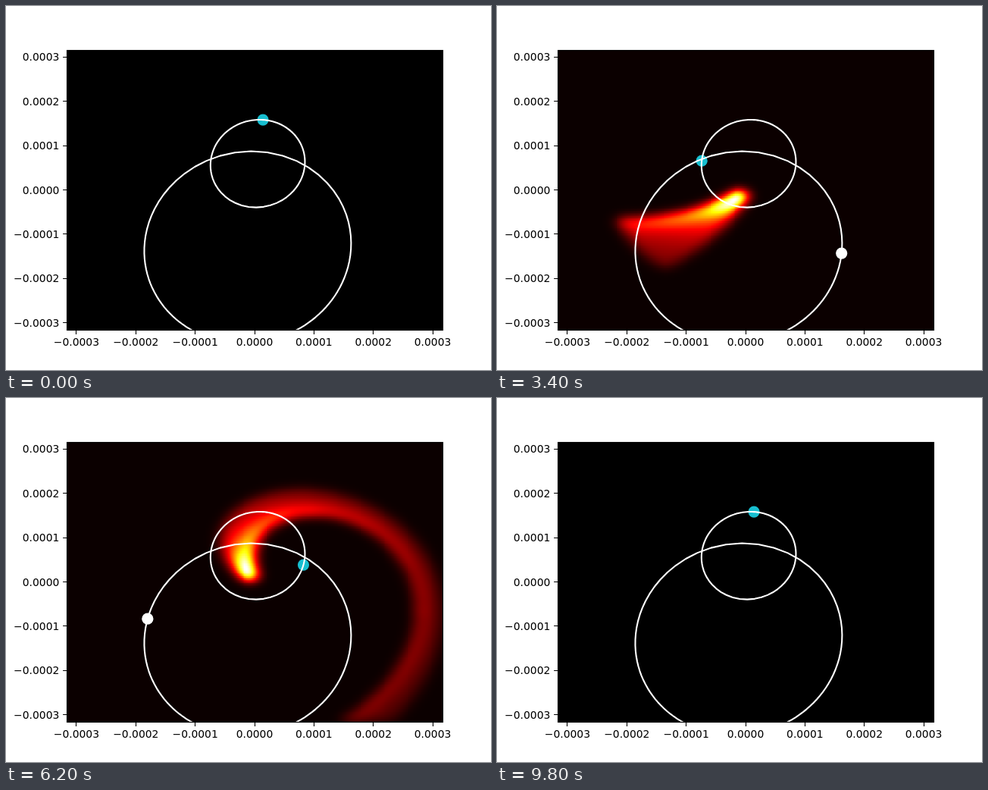
Write an HTML page with a canvas that moves like this. It is 640 by 480 pixels and loops after 10000 ms.

```html
<!DOCTYPE html>
<html lang="en">
<head>
<meta charset="utf-8">
<title>Binary orbit with dust outflow</title>
<style>
  html, body { margin: 0; width: 100%; height: 100%; overflow: hidden; background: #fff; }
  #stage { position: absolute; left: 0; top: 0; width: 640px; height: 480px; }
  #plot { position: absolute; left: 80px; top: 57.6px; width: 496px; height: 369.6px;
          image-rendering: pixelated; background: #000; }
  svg { position: absolute; left: 0; top: 0; }
  text { font: 13.89px "DejaVu Sans", sans-serif; fill: #000; }
  .orbit { fill: none; stroke: #fff; stroke-width: 2.08; stroke-linejoin: round; }
  .axis { fill: none; stroke: #000; stroke-width: 1.11; }
</style>
</head>
<body>
<div id="stage">
  <canvas id="plot" width="256" height="256"></canvas>
  <svg width="640" height="480" viewBox="0 0 640 480">
    <defs><clipPath id="area"><rect x="80" y="57.6" width="496" height="369.6"/></clipPath></defs>
    <g clip-path="url(#area)">
      <circle id="far" r="7.6" fill="#fff"/>
      <circle id="near" r="7.6" fill="#17becf"/>
      <path id="nearOrbit" class="orbit"/>
      <path id="farOrbit" class="orbit"/>
    </g>
    <rect class="axis" x="80.5" y="58.5" width="496" height="369"/>
    <g id="ticks"></g>
  </svg>
</div>
<script>
const $ = id => document.getElementById(id);
const TAU = 2 * Math.PI, DEG = Math.PI / 180;

// Plot coordinates are in units of 1e-4.
const LIMIT = 3.165, CX = 328, CY = 242.4;
const SX = 248 / LIMIT, SY = 184.8 / LIMIT;

const STEP = 200, FRAMES = 50, LAST = FRAMES - 1;

// Orbit, starting at apoapsis
const A = 0.992, ECC = 0.6, PERI = 264.9 * DEG, RATIO = 2.19;

// Dust: one limb of a cone, blown out at constant speed
const BIRTH = 11.9, DEATH = 37.3, SPEED = 0.42, R0 = 0.1;
const LIMB = 81.5 * DEG, SPAN = 35.5 * DEG, FALLOFF = -0.4, SIGMA = 4.8;

function star(k) {
  const m = (k / LAST - 0.5) * TAU;
  let E = m + ECC * Math.sin(m);
  for (let i = 0; i < 12; i++) E -= (E - ECC * Math.sin(E) - m) / (1 - ECC * Math.cos(E));
  const u = A * (Math.cos(E) - ECC), w = A * Math.sqrt(1 - ECC * ECC) * Math.sin(E);
  const c = Math.cos(PERI), s = Math.sin(PERI);
  return [u * c - w * s, u * s + w * c];
}

const toPx = ([x, y], scale = 1) => [CX + x * scale * SX, CY - y * scale * SY];

function orbitPath(scale) {
  const pts = Array.from({ length: 100 }, (_, i) =>
    toPx(star(i / 99 * LAST), scale).map(v => v.toFixed(2)).join(" "));
  return "M" + pts.join("L");
}

function buildAxes() {
  const snap = v => Math.floor(v) + 0.5;
  let out = "";
  for (let n = -3; n <= 3; n++) {
    const label = (n < 0 ? "\u2212" : "") + "0.000" + Math.abs(n);
    const x = CX + n * SX, y = CY - n * SY;
    out += `<path class="axis" d="M${snap(x)} 428v4.9M80 ${snap(y)}h-4.9"/>` +
      `<text x="${x}" y="448" text-anchor="middle">${label}</text>` +
      `<text x="70.3" y="${y + 5.1}" text-anchor="end">${label}</text>`;
  }
  $("ticks").innerHTML = out;
}

// Dust field
const N = 256, CELLS = N * N;
const radius = new Float32Array(CELLS), angle = new Float32Array(CELLS);
for (let i = 0; i < CELLS; i++) {
  const x = ((i % N + 0.5) / N * 2 - 1) * LIMIT;
  const y = (1 - (Math.floor(i / N) + 0.5) / N * 2) * LIMIT;
  radius[i] = Math.hypot(x, y);
  angle[i] = Math.atan2(y, x);
}

const FINE = 100;
const heading = Float32Array.from({ length: LAST * FINE + 1 }, (_, i) => {
  const [x, y] = star(i / FINE);
  return Math.atan2(y, x);
});

const REACH = Math.ceil(SIGMA * 4);
const kernel = Array.from({ length: 2 * REACH + 1 }, (_, i) =>
  Math.exp(-((i - REACH) ** 2) / (2 * SIGMA * SIGMA)));

function blur(src, stride, line) {
  const dst = new Float32Array(CELLS);
  for (let row = 0; row < N; row++) {
    for (let i = 0; i < N; i++) {
      const v = src[row * line + i * stride];
      if (!v) continue;
      const lo = Math.max(0, i - REACH), hi = Math.min(N - 1, i + REACH);
      for (let j = lo; j <= hi; j++) dst[row * line + j * stride] += v * kernel[j - i + REACH];
    }
  }
  return dst;
}

function dust(k) {
  const field = new Float32Array(CELLS);
  for (let i = 0; i < CELLS; i++) {
    const r = radius[i], s = k - (r - R0) / SPEED;
    if (r < R0 || s < BIRTH || s > DEATH) continue;
    let off = (angle[i] - heading[Math.round(s * FINE)] - LIMB) % TAU;
    if (off < 0) off += TAU;
    if (off < SPAN) field[i] = Math.pow(Math.max(off, 0.008), FALLOFF) / r;
  }
  return blur(blur(field, 1, N), N, 1);
}

const ctx = $("plot").getContext("2d");
const image = ctx.createImageData(N, N);

function paintDust(k) {
  ctx.clearRect(0, 0, N, N);
  if (k < BIRTH) return;
  const field = dust(k);
  let max = 0;
  for (const v of field) if (v > max) max = v;
  if (!max) return;
  const px = image.data;
  for (let i = 0; i < CELLS; i++) {
    const v = field[i] / max, p = i * 4;
    px[p] = 255 * (0.0416 + v * 0.9584 / 0.365);
    px[p + 1] = 255 * (v - 0.365) / 0.381;
    px[p + 2] = 255 * (v - 0.746) / 0.254;
    px[p + 3] = 255;
  }
  ctx.putImageData(image, 0, 0);
}

function place(id, [x, y]) {
  $(id).setAttribute("cx", x);
  $(id).setAttribute("cy", y);
}

let shown = -1;
function render(time) {
  const k = Math.floor(time / STEP) % FRAMES;
  if (k === shown) return;
  shown = k;
  const p = star(k);
  place("near", toPx(p));
  place("far", toPx(p, -RATIO));
  paintDust(k);
}

buildAxes();
$("nearOrbit").setAttribute("d", orbitPath(1));
$("farOrbit").setAttribute("d", orbitPath(-RATIO));

const start = performance.now();
function tick() {
  render(performance.now() - start);
  requestAnimationFrame(tick);
}
tick();
</script>
</body>
</html>
```
